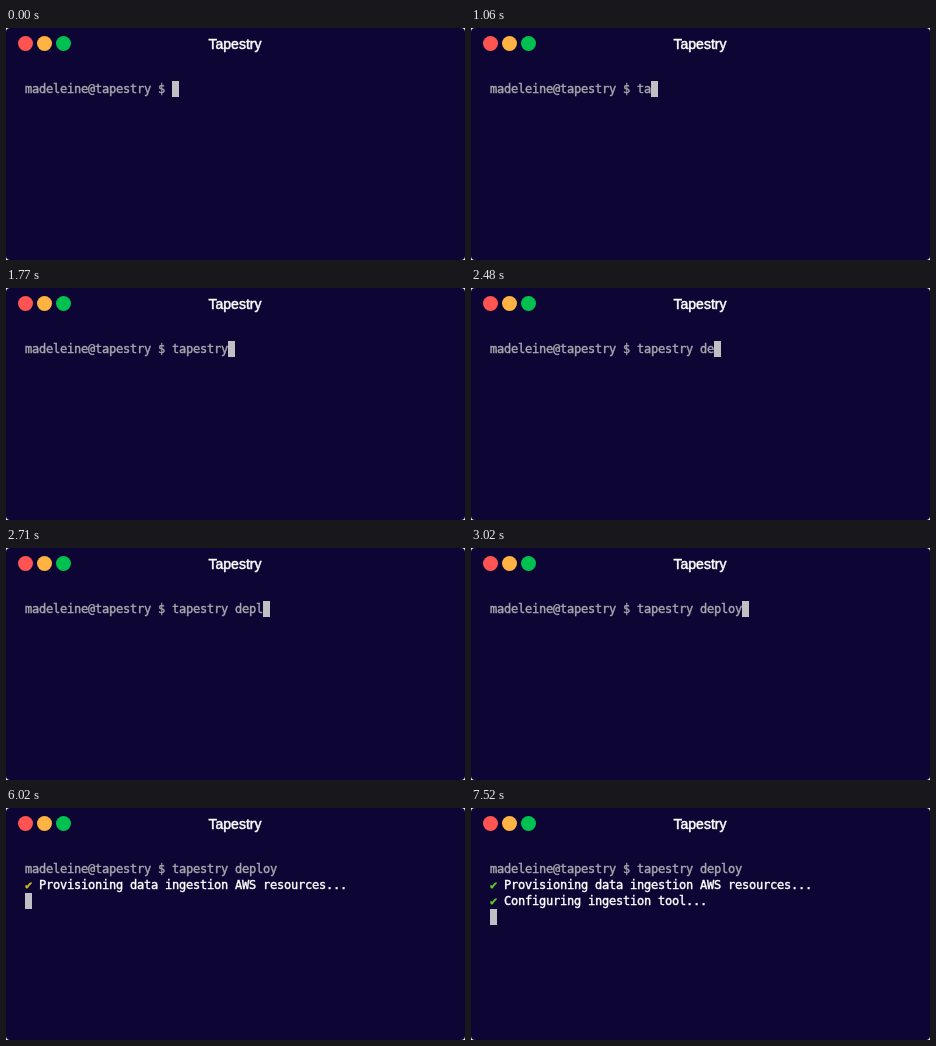
Animation, 459 px wide and 232 px high, one loop 8000 ms. Source, as an HTML page:

```html
<!DOCTYPE html>
<html lang="en">
<head>
<meta charset="utf-8">
<title>Terminal</title>
<style>
  html, body { margin: 0; width: 100%; height: 100%; overflow: hidden; background: #fff; }
  #window { position: relative; width: 459px; height: 232px; border-radius: 4px; background: #0d0634; }
  .light { position: absolute; top: 8px; width: 15px; height: 15px; border-radius: 50%; }
  #title {
    position: absolute; top: 8px; width: 458px; text-align: center; color: #fff;
    font: 14px/16px "Liberation Sans", Arial, sans-serif; -webkit-text-stroke: .5px;
  }
  #screen {
    position: absolute; left: 19px; top: 53px; margin: 0; color: #a9a7ae;
    font: 12px/16px "DejaVu Sans Mono", Menlo, monospace;
    letter-spacing: calc(7px - 1ch); -webkit-text-stroke: .4px;
  }
  #screen b { font-weight: normal; color: #fff; }
  #cursor { display: inline-block; width: 7px; height: 16px; vertical-align: top; background: #c1bfc4; }
</style>
</head>
<body>
<div id="window">
  <div class="light" style="left:12px; background:#ff5452"></div>
  <div class="light" style="left:31px; background:#ffb343"></div>
  <div class="light" style="left:50px; background:#00c150"></div>
  <div id="title">Tapestry</div>
  <pre id="screen"></pre>
</div>
<script>
const LOOP = 8000;
const PROMPT = "madeleine@tapestry $ ";
const COMMAND = "tapestry deploy";
const KEY_TIMES = [1000, 1060, 1200, 1260, 1410, 1510, 1670, 1770, 1880,
                   2430, 2480, 2670, 2710, 2910, 3020];
const ENTER = 4020;
const STEPS = [
  [6020, "Provisioning data ingestion AWS resources..."],
  [7520, "Configuring ingestion tool..."],
];
const screenEl = document.getElementById("screen");
let shown = "";

function render(t) {
  const typed = KEY_TIMES.filter(key => key <= t).length;
  const done = STEPS.filter(([start]) => start <= t);
  const tick = done.length > 1 ? "#5fc92e" : "#c9b91f";
  let html = PROMPT + COMMAND.slice(0, typed);
  if (t >= ENTER) html += "\n";
  for (const [, text] of done) html += `<span style="color:${tick}">✔</span> <b>${text}</b>\n`;
  html += '<span id="cursor"></span>';
  if (html !== shown) screenEl.innerHTML = shown = html;
}

function frame() {
  render(performance.now() % LOOP);
  requestAnimationFrame(frame);
}
frame();
</script>
</body>
</html>
```
